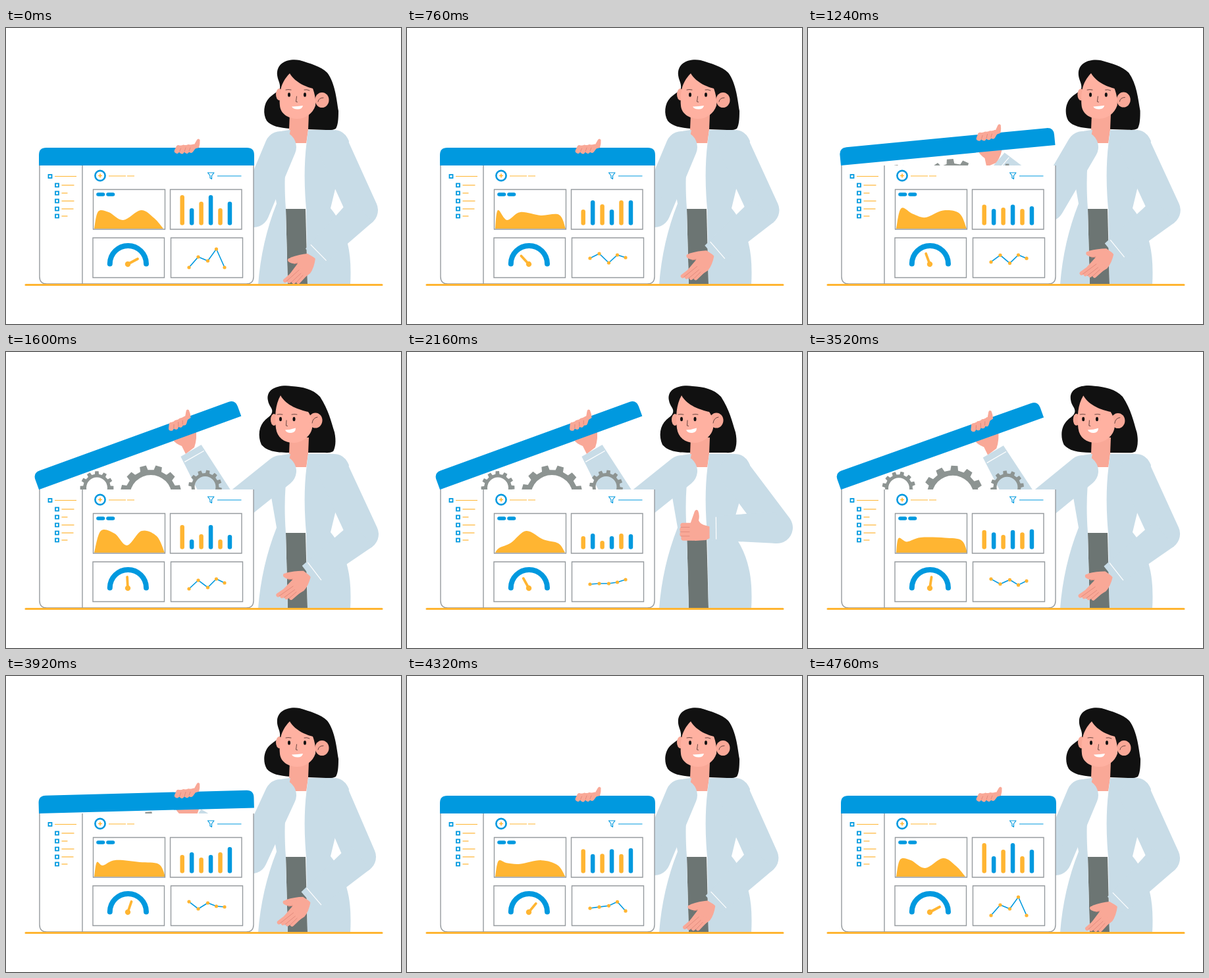
Animation of 600x450 px, one loop 4800 ms. Source, as an HTML page:

```html
<!DOCTYPE html>
<html lang="en">
<head>
<meta charset="utf-8">
<title>Dashboard presentation</title>
<style>
html, body { margin: 0; width: 100%; height: 100%; overflow: hidden; background: #fff; }
svg { display: block; width: 100vw; height: 100vh; fill: none; }
.coat { fill: #c8dce7; }
.sleeve { stroke: #c8dce7; stroke-linecap: round; stroke-width: 48; }
.skin { fill: #f9a897; }
.finger { stroke: #f9a897; stroke-linecap: round; stroke-linejoin: round; }
.crease { stroke: #dd8578; stroke-width: .8; stroke-linecap: round; }
.face { fill: #ffb1a1; }
.feature { stroke: #5b3c38; stroke-width: .9; stroke-linecap: round; }
.cuff { stroke: #fff; stroke-width: 1.2; }
.hair, .eye { fill: #111; }
.gear { fill: #8d9492; fill-rule: evenodd; }
.frame { stroke: #969b9f; stroke-width: 1.4; }
.blue { fill: #0099df; }
.yellow { fill: #ffb532; }
.blueLine { stroke: #0099df; }
.yellowLine { stroke: #ffb532; }
.paper { fill: #fff; }
.thin { stroke-width: 1.2; }
</style>
</head>
<body>
<svg viewBox="0 0 600 450">
  <path class="hair" id="hair"/>
  <path class="skin" d="M431 130H460L459 155 456 176H427L430 155Z"/>
  <path class="paper" d="M427 175H457L456 276H424Z"/>
  <path fill="#6c7573" d="M425 275H455L458 390H428Z"/>
  <ellipse class="skin" id="earL" rx="5" ry="9"/>
  <ellipse class="skin" id="earR" rx="10.5" ry="11.5"/>
  <path class="face" id="face"/>
  <path class="feature" id="lines"/>
  <path class="paper" id="mouth"/>
  <ellipse class="eye" id="eyeL" rx="2"/>
  <ellipse class="eye" id="eyeR" rx="2"/>

  <path class="coat" d="M432 155Q406 157 398 168L402 215 411 267Q388 325 383 390H428L425 275Q421 220 428 175Z"/>
  <path class="coat" d="M459 155H498Q514 155 521 172L500 245 493 274Q512 297 519 328Q525 352 523 390H458L456 275Q451 220 456.5 175Z"/>

  <line class="sleeve" id="upperL"/>
  <g id="palm"><g transform="rotate(20 51 209)">
    <path class="skin" d="M254 134Q258 125 268 121L288 115Q291 131 286 145L273 155 267 143Q257 139 254 134Z"/>
  </g></g>
  <path class="coat" id="foreL"/>
  <path class="cuff" id="cuffL"/>

  <line class="sleeve" id="upperR"/>
  <g id="hand">
    <g id="relaxed">
      <path class="skin" d="M432 349Q446 344 458 343L470 350Q468 365 462 373L450 382 431 374 443 358Q435 359 430 356Z"/>
      <path class="finger" stroke-width="6" d="M431 353L446 350M446 365L424 384"/>
      <path class="finger" stroke-width="6" d="M449 368L430 385M453 370L437 386M457 372L444 386"/>
      <path class="crease" d="M443 357L437 359M445 368L426 385M448 373L433 387M451 376L441 387"/>
    </g>
    <g id="thumbUp">
      <path class="skin" d="M430 262L436 245Q438 238 442 241Q445 248 443 256Q445 261 451 263L462 266V282L454 286 438 287 420 284V262Z"/>
      <path class="finger" stroke-width="7.5" d="M419 263.5H434M418 270H434M418 277H434M420 283H434"/>
      <path class="crease" d="M416 266.5H429M415 273.5H429M416 280H429"/>
    </g>
  </g>
  <path class="coat" id="foreR"/>
  <path class="cuff" id="cuffR"/>

  <g id="gears">
    <path class="gear" id="gearA"/>
    <path class="gear" id="gearB"/>
    <path class="gear" id="gearC"/>
  </g>

  <path class="frame paper" d="M51 209V378q0 11 11 11H365q11 0 11-11V209" />
  <path class="frame" d="M116 209V389"/>
  <g id="menu"></g>
  <circle class="blueLine" cx="143" cy="224.5" r="7.6" stroke-width="2.6"/>
  <path class="yellowLine" stroke-width="1.6" d="M140 224.5H146M143 221.5V227.5"/>
  <path class="yellowLine thin" d="M156 225H182M184 225H195"/>
  <path class="blueLine thin" stroke-linejoin="round" d="M306.500 220H316L312.500 224.500V229.500L310 228V224.500ZM321 225H357.500"/>

  <clipPath id="card"><rect x="133" y="246" width="108.500" height="60"/></clipPath>
  <path class="yellow" id="area" clip-path="url(#card)"/>
  <path class="frame" d="M132.500 245.500H241.500V306H132.500ZM249.500 245.500H358V306H249.500ZM132 319H240.500V379.500H132ZM250.500 319H359.500V379.500H250.500Z"/>
  <path class="blueLine" stroke-width="5.600" stroke-linecap="round" d="M140 253H147.500M155 253H162.500"/>
  <g id="bars" stroke-width="6.500" stroke-linecap="round"></g>
  <path class="blueLine" stroke-width="8" stroke-linecap="round" d="M157.800 358.500A27.500 27.500 0 0 1 213 358.500"/>
  <g id="needle">
    <path class="yellowLine" stroke-width="3.800" stroke-linecap="round" d="M185 359V342"/>
    <circle class="yellow" cx="185" cy="359" r="4.200"/>
  </g>
  <path class="blueLine" id="trend" stroke-width="1.600"/>
  <g id="dots"></g>

  <path class="blue" id="lid" d="M50 209V193Q50 182 61 182H366Q377 182 377 193V209Z"/>
  <g id="fingers">
    <path class="skin" d="M259 179L286 177 290 170Q292 167 294.500 170Q295 176 293 182L285 184 280 189 258 189Z"/>
    <path class="finger" stroke-width="7.500" d="M262 182L259.500 187M270 181.500L267 187.500M277.500 181L274.500 187M285 180.500L281 186"/>
    <path class="crease" d="M265.500 183L263.500 188M273 182L271 188M280 182L278 187"/>
  </g>
  <path class="yellowLine" stroke-width="3" stroke-linecap="round" d="M30 390.500H571"/>
</svg>
<script>
const LOOP = 4800;
const STOPS = [0, 760, 1600, 2160, 2960, 3920, 4760, 4800];
const $ = id => document.getElementById(id);
const set = (el, attrs) => { for (const k in attrs) el.setAttribute(k, attrs[k]); };
const lerp = (a, b, p) => a + (b - a) * p;
const mix = (a, b, p) => a.map((v, i) => lerp(v, b[i], p));
const clamp = x => Math.min(1, Math.max(0, x));
const ease = x => (x = clamp(x), x < .5 ? 4 * x ** 3 : 1 - 4 * (1 - x) ** 3);
const pulse = (t, a, b, c, d) => ease((t - a) / (b - a)) * (1 - ease((t - c) / (d - c)));

function add(parent, tag, attrs) {
  const el = document.createElementNS('http://www.w3.org/2000/svg', tag);
  set(el, attrs);
  return $(parent).appendChild(el);
}

// One row per stop; the last two stops repeat the first row.
function track(rows, t) {
  let i = 0;
  while (i < STOPS.length - 2 && t >= STOPS[i + 1]) i++;
  return mix(rows[i] || rows[0], rows[i + 1] || rows[0], (t - STOPS[i]) / (STOPS[i + 1] - STOPS[i]));
}

function morph(a, b, p) {
  const end = b.match(/[\d.]+/g);
  let i = 0;
  return a.replace(/[\d.]+/g, n => lerp(+n, +end[i++], p).toFixed(2));
}

const barRows = [
  [254, 274, 264, 264], [276, 262, 268, 262], [263, 285, 277, 278],
  [280, 276, 287, 277], [269, 283, 281, 283], [272, 268, 276, 260]
];
const trendRows = [
  [364, 348, 354, 336, 364], [350, 343, 357, 345, 349], [360, 347, 358, 345, 351],
  [353, 352, 352, 350, 346], [348, 351, 348, 360, 344], [343, 354, 345, 350, 351]
];
const areaRows = [
  [140, 279, 156, 280, 178, 292, 205, 277, 225, 289, 239, 305],
  [138, 277, 152, 292, 172, 280, 203, 285, 231, 284, 241, 305],
  [144, 272, 165, 276, 184, 294, 206, 272, 229, 280, 241, 305],
  [140, 298, 158, 290, 181, 272, 207, 285, 230, 291, 240, 305],
  [137, 283, 155, 289, 178, 285, 215, 282, 235, 287, 242, 305],
  [138, 283, 147, 288, 166, 280, 203, 283, 232, 286, 242, 305]
];
const needleRows = [[62], [-43], [-3], [-29], [-6], [19]];
const trendX = [278, 292, 306.5, 319.5, 332];

const head = {
  hair: [
    'M412 72C410 52 430 46 446 49C462 54 478 58 488 68C500 84 502 108 505 126C505 140 504 148 501 153C496 156 490 155 486 155L432 153C416 152 402 149 396 141C390 131 391 115 400 106C406 100 412 98 416 92C417 84 413 80 412 72Z',
    'M398 74C394 56 414 49 434 52C450 53 466 56 477 68C490 88 494 106 499 122C502 136 500 146 497 151C492 154 486 153 482 153L430 153C408 153 396 150 388 141C382 128 384 112 394 103C398 99 402 98 404 92C406 86 399 82 398 74Z'],
  face: [
    'M431 69C440 84 458 90 466 92C469 100 471 110 470 118C466 130 455 138 443 138C428 138 417 130 416 118C415 100 416 84 431 69Z',
    'M417 66C426 82 446 88 459 91C464 98 466 108 465 116C462 130 448 138 437 138C422 138 412 130 410 116C408 98 409 80 417 66Z'],
  lines: [
    'M425 94Q429 93 433 94M453 94Q457 93 461 95M441.5 104L440.5 112L442.5 112.5M474 112Q475 106 482 106',
    'M412 95Q416 94 420 95M434 95Q438 94 442 95M426 104L425.5 112L427.5 112.5M465 108Q466 100 473 99'],
  mouth: [
    'M434 119.5Q443 119 451 118Q450 123.5 443 123.5Q436 123.5 434 119.5Z',
    'M424 118.5Q433 118 440 115.5Q440 122.5 433 123Q426 123 424 118.5Z']
};
const headSpots = {
  earL: [[415, 101], [407, 103]], earR: [[480, 109.5], [470, 104]],
  eyeL: [[430, 101.5], [417, 102]], eyeR: [[454, 101.5], [437.5, 102]]
};

function smooth(p) {
  let d = `M${p[0]}`;
  for (let i = 0; i < p.length - 1; i++) {
    const a = p[i - 1] || p[i], b = p[i], c = p[i + 1], e = p[i + 2] || c;
    const c1 = [b[0] + (c[0] - a[0]) / 6, b[1] + (c[1] - a[1]) / 6];
    const c2 = [c[0] - (e[0] - b[0]) / 6, c[1] - (e[1] - b[1]) / 6];
    d += `C${c1} ${c2} ${c}`;
  }
  return d + 'Z';
}

function gear(cx, cy, r, body, hole, turn) {
  let d = '';
  const at = (rad, deg) => {
    const a = (deg + turn - 90) * Math.PI / 180;
    return `${(cx + rad * Math.cos(a)).toFixed(2)} ${(cy + rad * Math.sin(a)).toFixed(2)}`;
  };
  for (let k = 0; k < 360; k += 30) {
    d += `${k ? 'L' : 'M'}${at(body, k - 8.5)}L${at(r, k - 6)}L${at(r, k + 6)}L${at(body, k + 8.5)}`;
  }
  return `${d}ZM${cx - hole} ${cy}a${hole} ${hole} 0 1 0 ${2 * hole} 0a${hole} ${hole} 0 1 0 ${-2 * hole} 0Z`;
}

function drawArm(side, shoulder, elbow, wrist) {
  set($('upper' + side), { x1: shoulder[0], y1: shoulder[1], x2: elbow[0], y2: elbow[1] });
  const dx = wrist[0] - elbow[0], dy = wrist[1] - elbow[1], len = Math.hypot(dx, dy);
  const u = [dx / len, dy / len];
  const at = (back, off) => [wrist[0] - u[0] * back - u[1] * off, wrist[1] - u[1] * back + u[0] * off];
  set($('fore' + side), { d: `M${at(len, 24)}L${at(0, 18)}L${at(0, -18)}L${at(len, -24)}Z` });
  set($('cuff' + side), { d: `M${at(10, 17)}L${at(10, -17)}` });
}

[225.5, 239, 251, 263, 275, 286].forEach((y, i) => {
  const x = i ? 77.5 : 67;
  add('menu', 'rect', { class: 'blueLine', x: x - 2.5, y: y - 2.5, width: 5, height: 5, 'stroke-width': 1.8 });
  add('menu', 'path', { class: 'yellowLine thin', d: `M${x + 7} ${y}h${[33, 19, 9, 19, 18, 9][i]}` });
});
const bars = [0, 1, 2, 3, 4, 5].map(i => add('bars', 'line', {
  class: i % 2 ? 'blueLine' : 'yellowLine', x1: 267.7 + i * 14.45, x2: 267.7 + i * 14.45, y2: 296.5
}));
const dots = trendX.map(x => add('dots', 'circle', { class: 'yellow', cx: x, r: 2.6 }));

function drawCharts(t) {
  const h = track(barRows, t);
  [0, 1, 2, 0, 1, 3].forEach((k, i) => set(bars[i], { y1: h[k] + 3.2 }));
  const y = track(trendRows, t);
  dots.forEach((dot, i) => set(dot, { cy: y[i] }));
  set($('trend'), { d: 'M' + trendX.map((x, i) => `${x} ${y[i]}`).join('L') });
  const a = track(areaRows, t), pts = [[134, 305]];
  for (let i = 0; i < a.length; i += 2) pts.push([a[i], a[i + 1]]);
  set($('area'), { d: smooth(pts) });
  set($('needle'), { transform: `rotate(${track(needleRows, t)[0]} 185 359)` });
}

function drawHead(t) {
  const turn = pulse(t, 1120, 1580, 3380, 3880);
  for (const id in head) set($(id), { d: morph(...head[id], turn) });
  for (const id in headSpots) {
    const [cx, cy] = mix(...headSpots[id], turn);
    set($(id), { cx, cy });
  }
  const open = clamp(Math.abs(t - 2960) / 60 - .5);
  set($('eyeL'), { ry: 3.2 * open });
  set($('eyeR'), { ry: 3.2 * open });
}

function drawLid(t) {
  const p = pulse(t, 1000, 1590, 3400, 4110), a = 20 * p;
  const turn = `rotate(${-a} 51 209)`;
  set($('lid'), { transform: turn });
  set($('fingers'), { transform: `${turn} translate(${11 * p} ${3 * p})` });
  set($('palm'), { transform: `${turn} translate(${11 * p - 11} ${3 * p - 3})` });
  const [x, y] = mix([235, 14], [236.3, 23.2], p), r = a * Math.PI / 180;
  const wrist = [51 + x * Math.cos(r) + y * Math.sin(r), 209 - x * Math.sin(r) + y * Math.cos(r)];
  drawArm('L', [417, 181], mix([376, 279], [336, 246], p), wrist);

  const spin = t * 270 / LOOP;
  set($('gears'), { transform: `translate(0 ${37 * (1 - p)})` });
  set($('gearA'), { d: gear(220, 219, 47, 40, 32, spin + 15) });
  set($('gearB'), { d: gear(138, 206.5, 25.5, 21, 16, -spin) });
  set($('gearC'), { d: gear(302.5, 205, 25.5, 21, 16, -spin + 10) });
}

// Elbow x, elbow y, forearm angle
function drawRightArm(t) {
  const rest = [541, 277, 135.8], out = [542, 277, 142.5], back = [538, 275, 139.3];
  let pose;
  if (t < 1600) pose = mix(rest, out, clamp(t / 1600));
  else if (t < 3400) pose = mix(out, [562, 267, 179.5], pulse(t, 1660, 2130, 2960, 3390));
  else if (t < 3920) pose = mix(out, back, (t - 3400) / 520);
  else pose = mix(back, rest, ease((t - 3920) / 640));
  const [ex, ey, deg] = pose, r = deg * Math.PI / 180;
  const wrist = [ex + 102.5 * Math.cos(r), ey + 102.5 * Math.sin(r)];
  drawArm('R', [498, 182], [ex, ey], wrist);
  const up = deg > 161;
  const [hx, hy, base] = up ? [459.5, 268, 179.5] : [467.5, 348.5, 135.8];
  set($('hand'), { transform: `translate(${wrist}) rotate(${deg - base}) translate(${-hx} ${-hy})` });
  set($('relaxed'), { display: up ? 'none' : 'inline' });
  set($('thumbUp'), { display: up ? 'inline' : 'none' });
}

function draw() {
  const t = performance.now() % LOOP;
  drawCharts(t);
  drawHead(t);
  drawLid(t);
  drawRightArm(t);
  requestAnimationFrame(draw);
}
draw();
</script>
</body>
</html>
```
